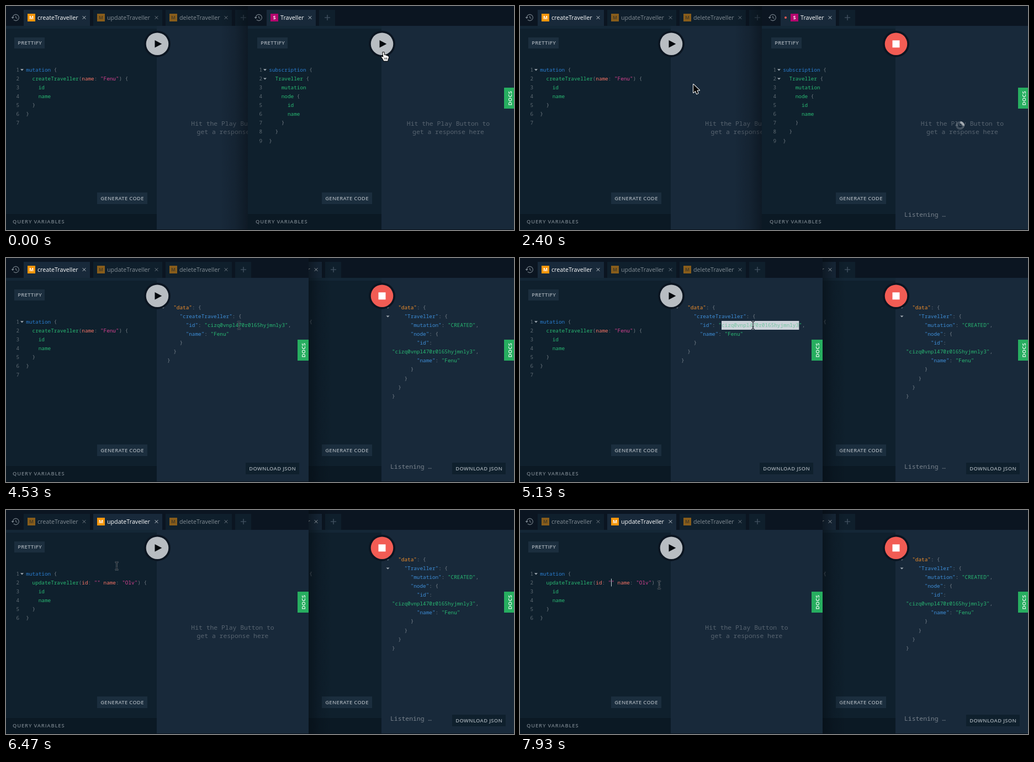
Write an HTML page with a canvas that moves like this. It is 920 px wide and 406 px high and loops after 8000 ms.

```html
<!DOCTYPE html>
<html lang="en">
<head>
<meta charset="utf-8">
<title>API playground</title>
<style>
html, body { margin: 0; width: 100%; height: 100%; overflow: hidden; background: #0b1521; }
canvas { display: block; }
</style>
</head>
<body>
<canvas id="stage" width="920" height="406"></canvas>
<script>
const ctx = document.getElementById('stage').getContext('2d');
const LOOP = 8000, CHAR = 5.61, LINE = 16.1;
const MONO = '"Noto Sans Mono", monospace', SANS = '"Open Sans", sans-serif';
const COLOR = {
  bar: '#0b1521', editor: '#0f202d', panel: '#18293a', strip: '#142736', footer: '#0b1924', button: '#1b2e3e',
  keyword: '#2a7ed2', field: '#29b973', attr: '#f77466', string: '#d64292', key: '#3e8ed8', root: '#f18e2a',
  dim: 'rgba(255,255,255,.4)', faint: 'rgba(255,255,255,.28)', label: '#a3acb4'
};
const AT = { subscribe: 450, focusLeft: 2520, run: 3150, response: 3470, select: 4850, switchTab: 5950, caret: 6890 };
const ID = 'cizq0vnpl470r0165hyjmnly3';

const CREATE = ['mutation {', '  createTraveller(name: "Fenu") {', '    id', '    name', '  }', '}', ''];
const UPDATE = ['mutation {', '  updateTraveller(id: "" name: "Olv") {', '    id', '    name', '  }', '}'];
const SUBSCRIBE = ['subscription {', '  Traveller {', '    mutation', '    node {', '      id', '      name', '    }', '  }', '}'];
const CREATED = ['{', '  "data": {', '    "createTraveller": {', `      "id": "${ID}",`, '      "name": "Fenu"', '    }', '  }', '}'];
const PUSHED = ['{', '  "data": {', '    "Traveller": {', '      "mutation": "CREATED",', '      "node": {', '        "id":',
  `"${ID}",`, '        "name": "Fenu"', '      }', '    }', '  }', '}'];

const QUERY_RULES = [[/^(mutation|subscription)(?= \{)/, 'keyword'], [/^"[^"]*"/, 'string'], [/^\w+(?=:)/, 'attr'], [/^\w+/, 'field']];
const RESULT_RULES = [[/^"data"/, 'root'], [/^"\w+"(?=:)/, 'key'], [/^"\w+"/, 'field']];

// Pointer stops: time, x, y
const PATH = [[0, 684, 84], [1150, 684, 84], [2150, 314, 142], [2600, 314, 142], [3000, 272, 72], [3600, 272, 72],
  [4300, 422, 122], [5300, 422, 122], [5750, 208, 18], [6030, 208, 18], [6450, 201, 101], [6800, 166, 132],
  [7350, 166, 132], [7930, 252, 136], [8000, 252, 136]];

function rect(x, y, w, h, fill) {
  ctx.fillStyle = fill;
  ctx.fillRect(x, y, w, h);
}

function disc(x, y, r, fill) {
  ctx.fillStyle = fill;
  ctx.beginPath();
  ctx.arc(x, y, r, 0, 7);
  ctx.fill();
}

function shape(points, fill, stroke, width = 1) {
  ctx.beginPath();
  points.forEach(([x, y]) => ctx.lineTo(x, y));
  ctx.closePath();
  if (stroke) { ctx.strokeStyle = stroke; ctx.lineWidth = width; ctx.lineJoin = 'round'; ctx.stroke(); }
  ctx.fillStyle = fill;
  ctx.fill();
}

function lines(color, width, ...paths) {
  ctx.strokeStyle = color;
  ctx.lineWidth = width;
  ctx.beginPath();
  for (const [x1, y1, x2, y2] of paths) { ctx.moveTo(x1, y1); ctx.lineTo(x2, y2); }
  ctx.stroke();
}

function text(str, x, y, font, fill, align = 'left', spacing = 0) {
  ctx.font = font;
  ctx.fillStyle = fill;
  ctx.textAlign = align;
  ctx.letterSpacing = spacing + 'px';
  ctx.fillText(str, x, y);
}

function label(str, x, y, fill = COLOR.label, spacing = .35) {
  text(str, x, y + 3.4, `600 9.35px ${SANS}`, fill, 'left', spacing);
}

function button(str, x, y, w, h, fill = COLOR.button) {
  rect(x, y, w, h, fill);
  label(str, x + 6.2, y + h / 2);
}

function foldArrow(x, y) {
  shape([[x - 3, y - 1.5], [x + 3, y - 1.5], [x, y + 1.7]], '#a3acb4');
}

function code(source, x, y, rules) {
  source.forEach((line, row) => {
    for (let col = 0; col < line.length;) {
      const rest = line.slice(col);
      let token = rest[0], color = COLOR.dim;
      for (const [pattern, name] of rules) {
        const match = rest.match(pattern);
        if (match) { token = match[0]; color = COLOR[name]; break; }
      }
      if (token !== ' ') text(token, x + col * CHAR, y + row * LINE + 3.2, `9.35px ${MONO}`, color);
      col += token.length;
    }
  });
}

function historyIcon(x, y) {
  const color = '#78838c';
  ctx.strokeStyle = color;
  ctx.lineWidth = 1.1;
  ctx.beginPath();
  ctx.arc(x + .8, y, 5.6, -Math.PI, Math.PI * .75);
  ctx.stroke();
  shape([[x - 7.4, y - 1], [x - 2.2, y - 1], [x - 4.8, y + 2.2]], color);
  lines(color, 1.1, [x + .8, y - 3, x + .8, y + .5], [x + .8, y, x + 3.4, y + 1.6]);
}

// Draws one tab and returns its right edge
function tab(x, { name, badge, color, active, live }) {
  const font = `10.7px ${SANS}`, inner = x + (live ? 11 : 0);
  ctx.font = font;
  ctx.letterSpacing = '0px';
  const right = Math.round(inner + 25 + ctx.measureText(name).width + 21.7);
  rect(x, 7, right - x, 29, active ? COLOR.panel : '#0f1f2c');
  if (live) disc(x + 9, 21, 2, '#f25c54');
  ctx.globalAlpha = active ? 1 : .52;
  rect(inner + 7, 14, 14, 14, color);
  text(badge, inner + 14, 24.2, `700 8.5px ${SANS}`, active ? '#fff' : '#0f1f2c', 'center');
  text(name, inner + 25, 25, font, active ? '#fff' : '#eef3f6');
  const cx = right - 10.5;
  lines('#c3cad0', 1, [cx - 2.8, 18.2, cx + 2.8, 23.8], [cx + 2.8, 18.2, cx - 2.8, 23.8]);
  ctx.globalAlpha = 1;
  return right;
}

function spinner(x, y, t) {
  const turn = t / 667 * Math.PI * 2;
  ctx.lineWidth = 4;
  for (const [from, to, color] of [[0, 7, 'rgba(255,255,255,.18)'], [turn, turn + 1.57, 'rgba(255,255,255,.5)']]) {
    ctx.strokeStyle = color;
    ctx.beginPath();
    ctx.arc(x, y, 5.8, from, to);
    ctx.stroke();
  }
}

function playButton(x, running) {
  const y = 68.7;
  disc(x, y, 24, '#0b1521');
  disc(x, y, 20.3, running ? '#f25c54' : '#b8bdc2');
  if (running) rect(x - 6.5, y - 6.4, 13, 13, '#fff');
  else shape([[x - 4.5, y - 6.8], [x + 8.3, y], [x - 4.5, y + 6.8]], '#05090d');
}

function drawWindow(w) {
  const { x, left, split, edge } = w;
  ctx.save();
  ctx.beginPath();
  ctx.rect(left, 0, edge - left, 406);
  ctx.clip();

  rect(left, 0, edge - left, 406, COLOR.bar);
  historyIcon(x + 17, 21);
  let end = x + 26;
  for (const t of w.tabs) end = tab(end + 6, t);
  rect(end + 6, 7, 29, 29, '#0f1f2c');
  lines('#3c4c5b', 1.6, [end + 16, 21, end + 26, 21], [end + 21, 16, end + 21, 26]);

  rect(left, 36, split - left, 370, COLOR.editor);
  rect(split, 36, edge - split, 370, COLOR.panel);
  rect(left, 36, split - left, 5, COLOR.strip);
  rect(left, 377, split - left, 29, COLOR.footer);
  rect(left, 405, edge - left, 1, '#08111a');

  button('PRETTIFY', x + 15, 57, 55, 20);
  button('GENERATE CODE', split - 108, 338, 91, 21);
  label('QUERY VARIABLES', x + 12, 391, '#747f88', .85);

  w.query.forEach((_, i) =>
    text(i + 1, x + 24, 118.7 + i * LINE, `9.35px ${MONO}`, 'rgba(255,255,255,.33)', 'right'));
  w.folds.forEach(row => foldArrow(x + 29, 115.8 + row * LINE));
  code(w.query, x + 36.3, 115.5, QUERY_RULES);
  if (w.caret) rect(x + 165, 124.5, 1, 14, '#c9d2d8');

  const middle = (split + edge) / 2;
  if (w.hint) {
    text('Hit the Play Button to', middle, 217, `11.4px ${MONO}`, COLOR.faint, 'center');
    text('get a response here', middle, 232.3, `11.4px ${MONO}`, COLOR.faint, 'center');
  }
  if (w.spin !== null) spinner(middle - 4, 216.5, w.spin);
  if (w.listening) text('Listening …', split + 16, 382, `11.4px ${MONO}`, 'rgba(255,255,255,.42)');
  if (w.result) {
    const selX = split + 92, selY = 114;
    if (w.selected) rect(selX, selY, 25 * CHAR, 16, '#ccd3da');
    w.resultFolds.forEach(row => foldArrow(split + 11.5, 73.7 + row * LINE));
    code(w.result, split + 19, 73.4, RESULT_RULES);
    if (w.selected) rect(selX, selY, 25 * CHAR, 16, 'rgba(204,211,218,.45)');
  }
  if (w.download) button('DOWNLOAD JSON', edge - 114, 371, 97, 21, COLOR.editor);

  playButton(split + 1, w.listening);
  rect(edge - 20, 148, 20, 38, '#27ae60');
  ctx.translate(edge - 9, 167);
  ctx.rotate(-Math.PI / 2);
  text('DOCS', 0, 3.4, `600 9.35px ${SANS}`, '#fff', 'center', .35);
  ctx.restore();
}

function shadow(from, to) {
  const g = ctx.createLinearGradient(from, 0, to, 0);
  g.addColorStop(0, 'rgba(4,10,16,.5)');
  g.addColorStop(.45, 'rgba(4,10,16,.18)');
  g.addColorStop(1, 'rgba(4,10,16,0)');
  rect(Math.min(from, to), 0, Math.abs(to - from), 406, g);
}

function pointerAt(t) {
  const i = PATH.findIndex(stop => stop[0] > t);
  const [t0, x0, y0] = PATH[i - 1], [t1, x1, y1] = PATH[i];
  const p = (t - t0) / (t1 - t0), eased = p * p * (3 - 2 * p);
  return [x0 + (x1 - x0) * eased, y0 + (y1 - y0) * eased];
}

function pointerKind(x, y, leftOnTop, hasResult) {
  const playX = leftOnTop ? 274 : 681;
  if (Math.hypot(x - playX, y - 69) < 24 || y < 36) return 'hand';
  if (leftOnTop) return y > 88 && (x < 273 || hasResult) ? 'beam' : 'arrow';
  return x > 438 && x < 680 && y > 88 ? 'beam' : 'arrow';
}

function drawPointer(kind, x, y) {
  ctx.save();
  ctx.translate(x, y);
  if (kind === 'arrow') {
    shape([[0, 0], [0, 15], [3.6, 11.8], [6, 17.3], [8.6, 16.2], [6.3, 10.8], [11, 10.8]], '#000', '#fff', 2);
  } else if (kind === 'hand') {
    shape([[-1.6, 0], [.6, 0], [1.2, 5], [3.6, 4.8], [4.2, 6], [6.4, 5.8], [7, 7], [8.6, 7.2], [9, 9.5], [7.6, 13], [7.4, 15.5],
      [.2, 15.5], [-1.6, 12], [-4, 8.6], [-3.4, 7.4], [-.6, 9]], '#fff', '#000', 2);
    lines('#000', .8, [1.6, 9.5, 1.8, 13], [3.8, 9.5, 3.8, 13], [5.8, 9.5, 5.7, 13]);
  } else {
    const beam = [[0, -6, 0, 6], [-3, -7.5, 0, -6], [3, -7.5, 0, -6], [-3, 7.5, 0, 6], [3, 7.5, 0, 6], [-1.5, 3, 1.5, 3]];
    lines('rgba(210,218,224,.5)', 2.4, ...beam);
    lines('#0a1119', 1.1, ...beam);
  }
  ctx.restore();
}

function draw(t) {
  const leftOnTop = t >= AT.focusLeft, updating = t >= AT.switchTab;
  const live = t >= AT.subscribe, answered = t >= AT.response, ran = t >= AT.run && !updating;
  const mutation = (name, active) => ({ name, active, badge: 'M', color: '#f7960c' });

  const leftWindow = {
    x: 0, left: 0, split: 273, edge: 548,
    tabs: [mutation('createTraveller', !updating), mutation('updateTraveller', updating), mutation('deleteTraveller', false)],
    query: updating ? UPDATE : CREATE, folds: [0],
    caret: t >= AT.caret && (t - AT.caret) % 1020 < 510,
    hint: !ran, spin: ran && !answered ? t - 3567 : null,
    result: ran && answered ? CREATED : null, resultFolds: [1],
    selected: t >= AT.select, download: ran
  };
  const rightWindow = {
    x: 440, left: 438, split: 680, edge: 922,
    tabs: [{ name: 'Traveller', badge: 'S', color: '#b5056e', active: true, live }],
    query: SUBSCRIBE, folds: [0, 1],
    hint: !answered, spin: live && !answered ? t - 2560 : null, listening: live,
    result: answered ? PUSHED : null, resultFolds: [1, 2], download: answered
  };

  if (leftOnTop) {
    drawWindow(rightWindow);
    shadow(548, 590);
    drawWindow(leftWindow);
  } else {
    drawWindow(leftWindow);
    shadow(438, 388);
    drawWindow(rightWindow);
  }
  const [x, y] = pointerAt(t);
  drawPointer(pointerKind(x, y, leftOnTop, ran && answered), x, y);
}

function frame() {
  draw(performance.now() % LOOP);
  requestAnimationFrame(frame);
}
frame();
</script>
</body>
</html>
```
